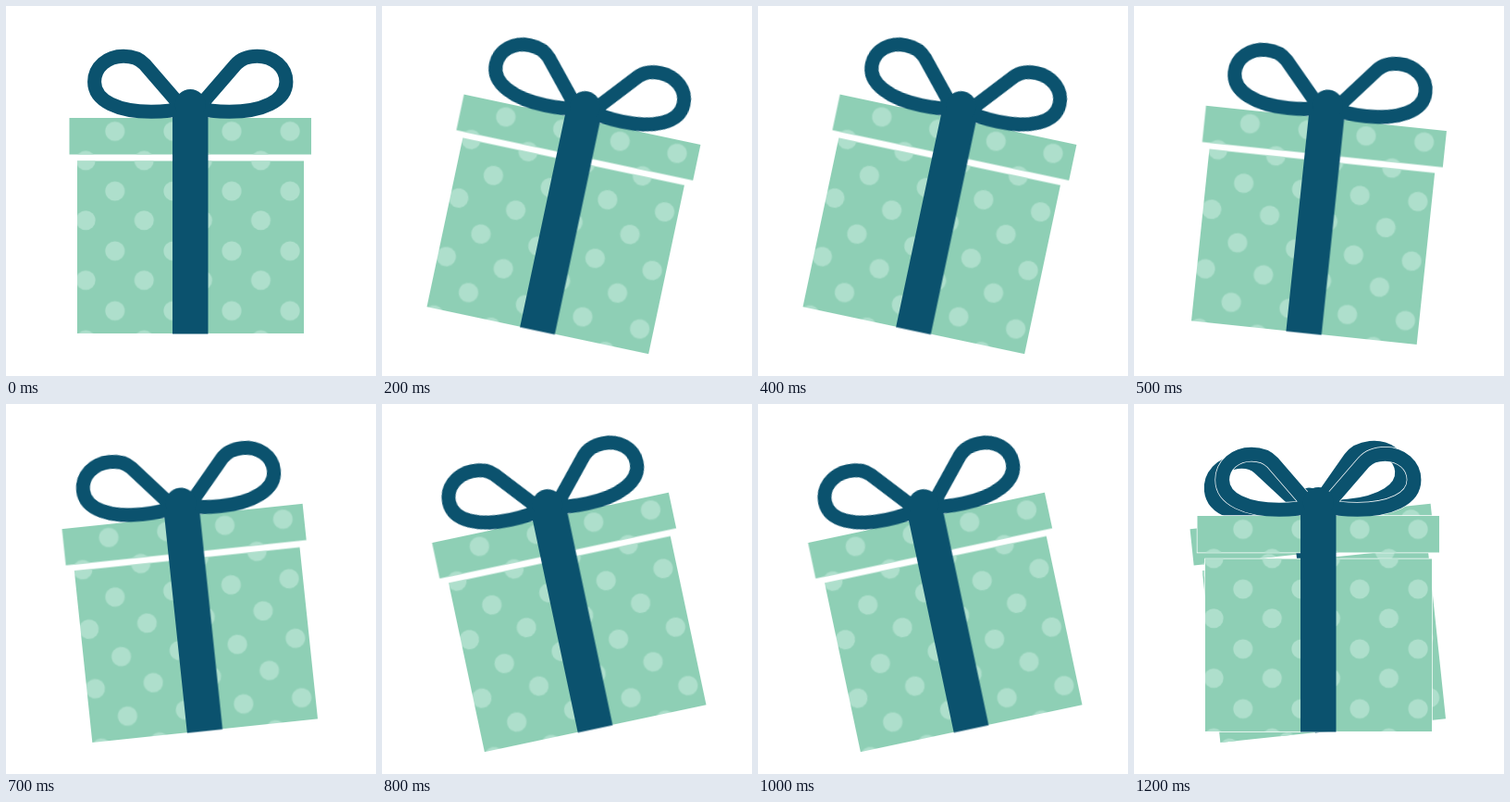
An HTML page that plays this animation: 400x400 px, repeating every 1.3 s.

```html
<!DOCTYPE html>
<html lang="en">
<head>
<meta charset="utf-8">
<title>Swinging gift</title>
<style>
  html, body { margin: 0; width: 100%; height: 100%; overflow: hidden; background: #fff; }
  svg { display: block; width: 100%; height: 100%; }

  .swing { transform-origin: 199.5px 204px; animation: swing 1300ms infinite; }
  .trail { visibility: hidden; animation: trail 1300ms step-end infinite; }

  /* Six degrees per 100 ms; percentages sit just below each switch. */
  @keyframes swing {
    0%     { transform: rotate(0deg);   animation-timing-function: steps(3, end); }
    23.07% { transform: rotate(18deg);  animation-timing-function: steps(6, end); }
    69.22% { transform: rotate(-18deg); animation-timing-function: steps(3, end); }
    92.3%, 100% { transform: rotate(0deg); }
  }
  @keyframes trail {
    0%    { visibility: hidden; }
    92.3%, 100% { visibility: visible; }
  }

  .green { fill: #8ecfb5; }
  .dots { fill: url(#dots); }
  .navy { fill: #0b526e; }
  .bow { fill: none; stroke: #0b526e; stroke-width: 15; }
  .fringe { fill: none; stroke: #fff; stroke-width: 1.4; }
  .fringe .loops { stroke-width: 16.4; }
</style>
</head>
<body>
<svg viewBox="0 0 400 400">
  <defs>
    <pattern id="dots" patternUnits="userSpaceOnUse" x="102" y="119.5" width="63.1" height="64.7">
      <g fill="#aedfcc">
        <circle cx="15.8" cy="16" r="10.5"/>
        <circle cx="47.3" cy="47.5" r="10.5"/>
      </g>
    </pattern>
    <path id="box" d="M68.5 121H330V160.5H68.5ZM77 167.4H322V354H77Z"/>
    <path id="loop" d="M190 109.3L150 63.2C144.2 56.6 136 54.2 127 54.2C109.5 54.2 95.6 66 95.6 82C95.6 103 122 114.2 157 114.2C170 114.2 182 113 192 110"/>
    <g id="loops">
      <use href="#loop"/>
      <use href="#loop" transform="matrix(-1 0 0 1 398.5 0)"/>
    </g>
    <g id="wrap">
      <use href="#box" class="green"/>
      <use href="#box" class="dots"/>
    </g>
    <g id="ribbon">
      <use href="#loops" class="bow"/>
      <circle class="navy" cx="199.25" cy="106.5" r="16.5"/>
      <path class="navy" d="M180 115H218.5V354.4H180Z"/>
    </g>
  </defs>

  <!-- Leftover of the previous pose, seen only at the end of the loop -->
  <g class="trail">
    <g transform="rotate(-6 199.5 204)">
      <use href="#wrap"/>
      <use href="#ribbon"/>
    </g>
    <g class="fringe">
      <use href="#box"/>
      <use href="#loops" class="loops"/>
    </g>
  </g>

  <g class="swing">
    <use href="#wrap"/>
    <use href="#ribbon"/>
  </g>
</svg>
</body>
</html>
```
